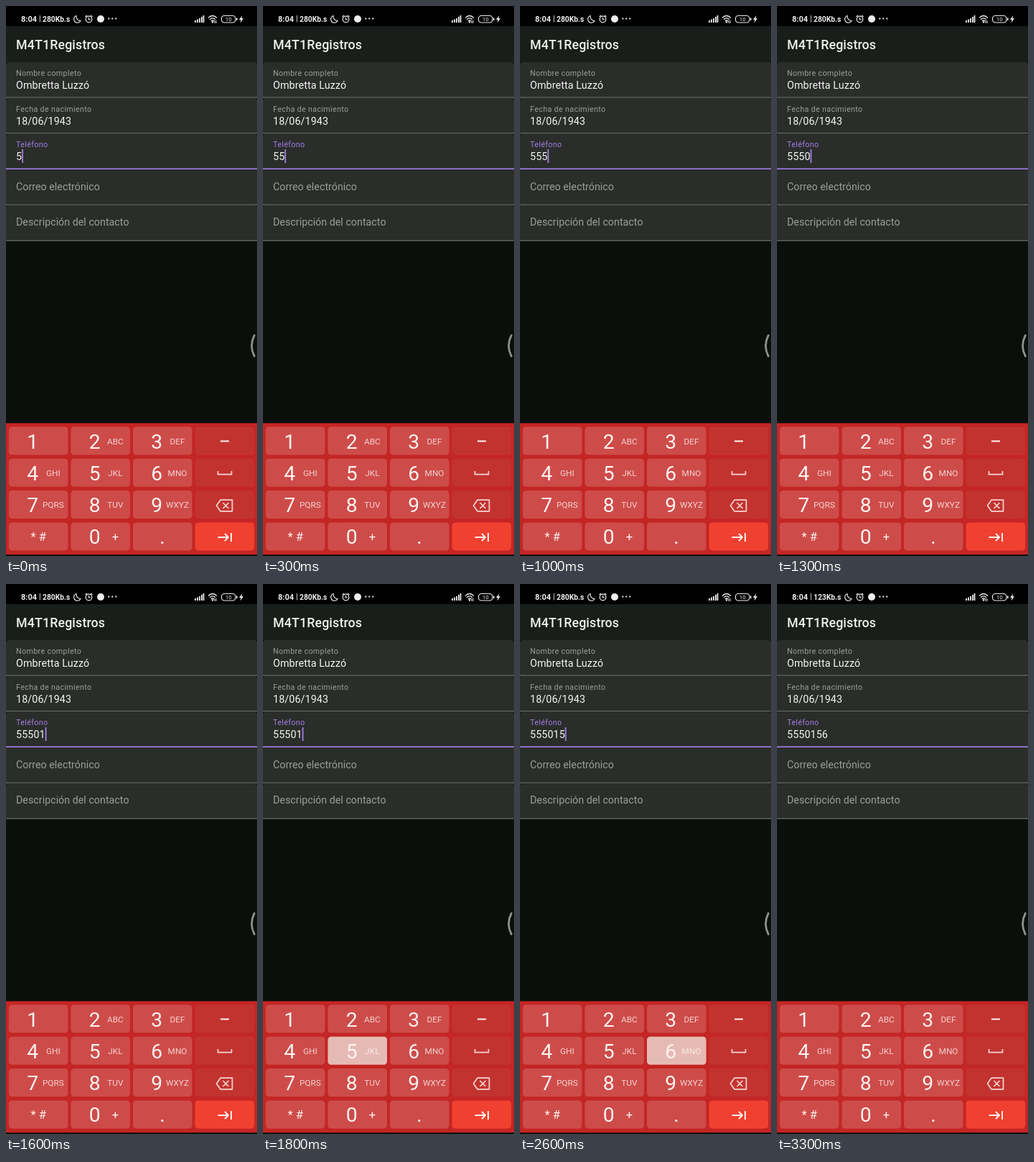
Animation of 350x764 px, one loop 3.6 s. Source, as an HTML page:

```html
<!DOCTYPE html>
<html lang="es">
<head>
<meta charset="utf-8">
<style>
  html, body { margin: 0; width: 100%; height: 100%; overflow: hidden; background: #0b0f0b; }
  svg { display: block; width: 350px; height: 764px; font-family: Roboto, sans-serif; }
  .title { font-size: 17.8px; font-weight: 500; fill: #eef0ee; letter-spacing: .15px; }
  .label { font-size: 10.7px; letter-spacing: .36px; fill: #9b9f9b; }
  .active { fill: #a37fe6; }
  .value { font-size: 14.25px; letter-spacing: .13px; fill: #f4f5f4; }
  .hint { font-size: 14.25px; letter-spacing: .02px; fill: #9b9f9b; }
  .status { font-weight: 600; font-size: 11px; fill: #eee; }
  .digit { font-size: 28.3px; }
  .sub { font-size: 11.8px; opacity: .8; }
  .sign { font-size: 16.5px; }
  #keys text { fill: #fff3f1; text-anchor: middle; }
  .line { fill: none; stroke: #eee; stroke-width: 1.2; }
  .icon { fill: none; stroke: #f6d5d1; stroke-width: 1.7; stroke-linejoin: round; }
</style>
</head>
<body>
<svg viewBox="0 0 350 764">
  <rect width="350" height="28" fill="#000"/>
  <rect y="28" width="350" height="50" fill="#1a1e1a"/>

  <g class="status">
    <text x="21" y="22">8:04</text>
    <text x="46" y="21" font-size="10">|</text>
    <text id="speed" x="51" y="22" style="font-size:10.3px"></text>
  </g>
  <path class="line" d="M98 13.5A5 5 0 1 0 104 20.5A6 6 0 0 1 98 13.5Z"/>
  <circle class="line" cx="115.5" cy="18.5" r="4.3"/>
  <path class="line" d="M115.5 16V19H118M110.5 15L113 13M120.5 15L118 13"/>
  <circle cx="132" cy="18" r="5" fill="#eee"/>
  <path d="M142.3 17.5h2m3 0h2m3 0h2" stroke="#eee" stroke-width="2"/>
  <path d="M264 23v-3m3 3v-4.5m3 4.5v-6m3 6v-8m2.5 8v-10" stroke="#eee" stroke-width="1.8"/>
  <path class="line" d="M282 16.5Q288 10.5 294 16.5M284 18.8Q288 15 292 18.8M286 21Q288 19 290 21"/>
  <circle cx="288" cy="22.5" r="1.2" fill="#eee"/>
  <path d="M291 20v4m2-4v4" stroke="#eee"/>
  <rect class="line" x="300.5" y="13.5" width="19.5" height="9.5" rx="4"/>
  <path d="M321.8 16.5v3.5" stroke="#eee" stroke-width="1.5"/>
  <text x="310.3" y="21.2" text-anchor="middle" font-size="8" fill="#eee">10</text>
  <path d="M329.5 13L325 19h2.5L326.5 23.5L331 17.3h-2.6Z" fill="#eee"/>

  <text class="title" x="14" y="60">M4T1Registros</text>
  <g id="fields"></g>
  <rect id="caret" y="199" width="1.8" height="19" fill="#a37fe6"/>
  <path d="M346.3 457.5Q338.8 472 346.3 486.5" fill="none" stroke="#8f918f" stroke-width="2.8" stroke-linecap="round"/>

  <rect y="579.5" width="350" height="182.5" fill="#c42525"/>
  <g id="keys"></g>
  <g class="icon">
    <path d="M299 604.5h12" stroke="#fff3f1" stroke-width="2"/>
    <path d="M295.5 646v4.7h19v-4.7"/>
    <path d="M299 686.2h16.5v15.6h-16.5L293.5 694ZM302.5 690l8 8m0-8l-8 8"/>
    <path d="M295.5 738h14.5m-5-5l5 5l-5 5M314 732v12" stroke="#fff3f1" stroke-width="1.9"/>
  </g>
</svg>
<script>
const LOOP = 3600, HOLD = 200;
const number = '5550156';
const typedAt = [0, 300, 1000, 1300, 1600, 2000, 2700];
const byId = id => document.getElementById(id);
const text = (cls, x, y, s) => `<text class="${cls}" x="${x}" y="${y}">${s}</text>`;

const fields = [
  ['Nombre completo', 'Ombretta Luzzó'],
  ['Fecha de nacimiento', '18/06/1943'],
  ['Teléfono', '<tspan id="phone"></tspan>'],
  ['Correo electrónico'],
  ['Descripción del contacto']
];
byId('fields').innerHTML = fields.map(([label, value], i) => {
  const y = 78 + i * 49.7, active = i === 2;
  const [dy, height, color] = active ? [48, 2, '#a37fe6'] : [48.6, 1, '#858985'];
  const body = value
    ? text(active ? 'label active' : 'label', 14, Math.round(y + 18.8), label)
      + text('value', 14, Math.round(y + 36.8), value)
    : text('hint', 14, Math.round(y + 28.5), label);
  return `<path d="M0 ${y + 49}V${y + 4}Q0 ${y} 4 ${y}H346Q350 ${y} 350 ${y + 4}V${y + 49}Z" fill="#2a2d2a"/>`
    + `<rect y="${y + dy}" width="350" height="${height}" fill="${color}"/>` + body;
}).join('');

const rows = ['1 2,ABC 3,DEF -', '4,GHI 5,JKL 6,MNO -', '7,PQRS 8,TUV 9,WXYZ -', '*# 0,+ . -'];
byId('keys').innerHTML = rows.map((row, r) => row.split(' ').map((key, c) => {
  const x = 3.8 + c * 86.6, y = 584.5 + r * 44.3, mid = y + 20;
  const [main, sub] = key.split(',');
  const fill = c < 3 ? '#cd4c49' : r < 3 ? '#c23330' : '#f04130';
  let out = `<rect id="key${main}" x="${x}" y="${y}" width="82.6" height="39" rx="4.5" fill="${fill}" data-fill="${fill}"/>`;
  if (main === '*#') out += text('sign', x + 41.5, mid + 6, '* #');
  else if (main === '.') out += text('digit', x + 41, mid + 9.5, '.');
  else if (main !== '-') out += text('digit', x + 33.3, mid + 10, main);
  if (sub === '+') out += text('sign', x + 62, mid + 5.5, sub);
  else if (sub) out += text('sub', x + 62, mid + 4.3, sub);
  return out;
}).join('')).join('');

const digitKeys = [...'0123456789'].map(d => byId('key' + d));

function draw(now) {
  const t = now % LOOP;
  const count = typedAt.filter(at => at <= t).length;
  const pressed = t >= typedAt[count] - HOLD ? number[count] : null;
  const blinkOff = (t >= 700 && t < 1000) || t >= 3200;
  byId('phone').textContent = number.slice(0, count);
  byId('caret').setAttribute('x', 14 + 8.13 * count);
  byId('caret').style.opacity = blinkOff ? 0 : 1;
  byId('speed').textContent = t < 3300 ? '280Kb.s' : '123Kb.s';
  digitKeys.forEach((key, d) => key.setAttribute('fill', String(d) === pressed ? '#e6bab4' : key.dataset.fill));
}

const start = performance.now();
function tick() {
  draw(performance.now() - start);
  requestAnimationFrame(tick);
}
tick();
</script>
</body>
</html>
```
